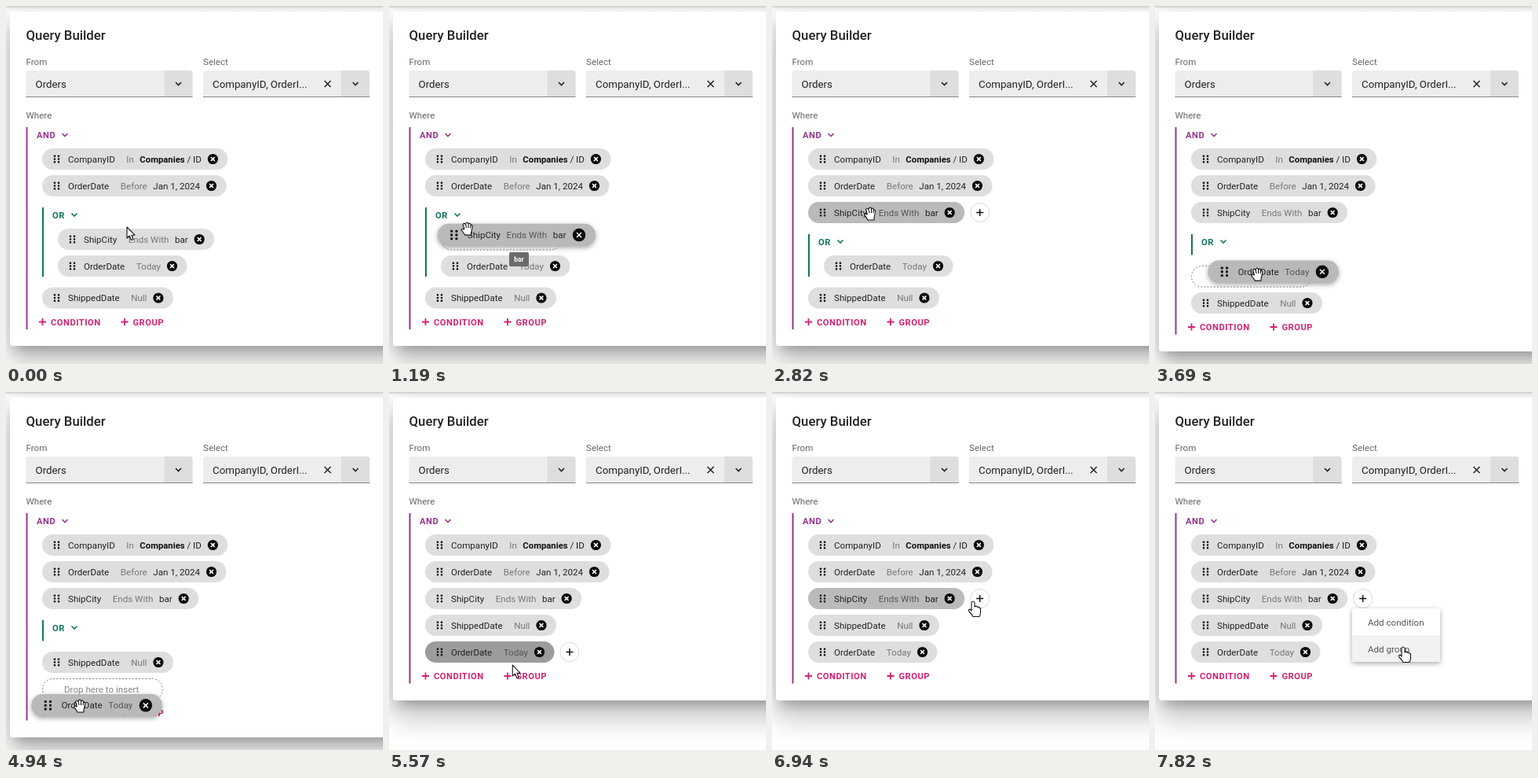
Animation of 480 by 455 pixels, one loop 8000 ms. Source, as an HTML page:

```html
<!DOCTYPE html>
<html lang="en">
<head>
<meta charset="utf-8">
<title>Query Builder</title>
<style>
html, body { margin: 0; width: 100%; height: 100%; overflow: hidden; background: #fff; }
#stage { position: relative; width: 100%; height: 100%; overflow: hidden; contain: strict; }
#panel { position: absolute; left: 5px; top: 7px; right: -40px; background: #fff; border-radius: 4px;
  box-shadow: 0 11px 15px -7px rgba(0,0,0,.26), 0 21px 34px 1px rgba(0,0,0,.16), 0 9px 46px 6px rgba(0,0,0,.11); }
#edge { position: absolute; top: 0; width: 100%; height: 4px; background: linear-gradient(#ccc, transparent); }
svg { position: absolute; left: 0; top: 0; font: 11.6px Roboto, Inter, sans-serif; fill: #222; }
.title { font-size: 16.8px; font-weight: 500; }
.label { fill: #666; }
.value { font-size: 13.3px; }
.caps { font-size: 11.2px; font-weight: 600; letter-spacing: .5px; }
.bold { font-weight: 700; font-size: 11.3px; fill: #111; }
.line { fill: none; stroke: #222; stroke-width: 1.4; }
.lift { filter: drop-shadow(0 2px 3px rgba(0,0,0,.35)); }
.cursor { fill: #fff; stroke: #111; stroke-width: 1.1; stroke-linejoin: round; }
</style>
</head>
<body>
<div id="stage">
  <div id="panel"></div>
  <div id="edge"></div>
  <svg width="480" height="455" viewBox="0 0 480 455">
    <text class="title" x="25.5" y="43">Query Builder</text>
    <g class="label">
      <text x="25.5" y="75">From</text>
      <text x="251" y="75">Select</text>
      <text x="25.5" y="143">Where</text>
    </g>
    <g id="fields"></g>
    <g id="scene"></g>
  </svg>
</div>
<script>
const LOOP = 8000, LAG = 45, DROPPED = 5150, CLICK = 6690, MENU = 7130;
const PURPLE = '#97358f', TEAL = '#12765f', PINK = '#d42273';
const $ = id => document.getElementById(id);

const chips = {
  C: { name: 'CompanyID', op: 'In', bold: 'Companies', val: ' / ID' },
  B: { name: 'OrderDate', op: 'Before', val: 'Jan 1, 2024' },
  S: { name: 'ShipCity', op: 'Ends With', val: 'bar', grab: 34 },
  T: { name: 'OrderDate', op: 'Today', grab: 63 },
  N: { name: 'ShippedDate', op: 'Null' }
};

// Row order over time: D is the drop slot, brackets enclose the OR group
const orders = [
  [0, 'CB[ST]N'], [700, 'CB[DT]N'], [1290, 'CBD[T]N'], [1380, 'CDB[T]N'], [2070, 'CBD[T]N'],
  [2720, 'CBS[T]N'], [3500, 'CB S[D]N'.replace(' ', '')], [3620, 'CBS[]DN'], [4250, 'CBS[]ND'], [DROPPED, 'CBSNT']
];

// Pointer stops: time, x, y
const stops = [
  [70, 154, 281], [380, 100, 297], [570, 100, 297], [1070, 93, 297], [1500, 127, 225], [1780, 127, 220],
  [2200, 125, 264], [3190, 125, 264], [3480, 131, 331], [3940, 129, 354], [4440, 124, 385], [4600, 124, 385],
  [4940, 94, 399], [5200, 94, 399], [6070, 256, 266], [MENU, 256, 266], [7820, 316, 324]
];

const cursors = {
  arrow: 'M0 0V14L3.2 11L5.6 16.5L8 15.4L5.8 10.2H10Z',
  grab: 'M-4-1L-5.5-5.5Q-4-8-2-5.5Q-1-9 1-7.5L2-6.3Q4-8 4.7-5Q7-5 6.6-2L5 5V8H-3Q-5 4-7.5 1.5Q-7-1-4 1Z' +
    'M-2-5.5L-1-1M1.5-6.5V-1M4.6-5L4-.8',
  point: 'M-2 1.5Q0-1.5 2 1.5V7Q4 5 5.5 7.5Q7.5 6 8 8.5Q10 8 9.5 11V14Q9.5 17 8 19.5H0Q-2 16-5 13Q-6.5 10.5-4 10L-2 12Z'
};

function pointer(t) {
  const i = stops.findIndex(s => s[0] > t);
  if (i < 1) return stops.at(i).slice(1);
  const [a, b] = [stops[i - 1], stops[i]];
  const u = (t - a[0]) / (b[0] - a[0]), k = u * u * (3 - 2 * u);
  return [a[1] + (b[1] - a[1]) * k, a[2] + (b[2] - a[2]) * k];
}

// Lay each chip out from the widths of its texts
const pen = document.createElement('canvas').getContext('2d');
function measure(s = '', font = '11.6px') {
  pen.font = font + ' Roboto, Inter, sans-serif';
  return pen.measureText(s).width;
}
for (const c of Object.values(chips)) {
  c.opX = 47.5 + measure(c.name);
  c.valX = c.opX + measure(c.op) + 7.5;
  const end = c.val ? c.valX + measure(c.bold, '700 11.3px') + measure(c.val) : c.valX - 7.5;
  c.closeX = end + 14.5;
  c.w = c.closeX + 19;
}

const text = (x, y, s, attrs = '') => `<text x="${x}" y="${y}" ${attrs}>${s}</text>`;
const rect = (x, y, w, h, r, fill, attrs = '') =>
  `<rect x="${x}" y="${y}" width="${w}" height="${h}" rx="${r}" fill="${fill}" ${attrs}/>`;
const stroke = (d, color = '#222', width = 1.4) =>
  `<path class="line" d="${d}" style="stroke:${color};stroke-width:${width}"/>`;
const chevron = (x, y, color) => stroke(`M${x - 3.5} ${y - 2}l3.5 3.5l3.5-3.5`, color, 1.6);
const cross = (x, y, r, color) =>
  stroke(`M${x - r} ${y - r}l${2 * r} ${2 * r}M${x + r} ${y - r}l${-2 * r} ${2 * r}`, color, 1.5);
const plus = (x, y, r, color, width) => stroke(`M${x - r} ${y}h${2 * r}M${x} ${y - r}v${2 * r}`, color, width);

function field(x, label) {
  return `<path d="M${x} 116V86q0-4 4-4h204q4 0 4 4v30z" fill="#ededed"/>` +
    `<path d="M${x + 176} 116V82h32q4 0 4 4v30z" fill="#dedede"/>` +
    rect(x, 115, 212, 1, 0, '#888') + text(x + 12, 104, label, 'class="value"') + chevron(x + 194, 99);
}

function handle(x, y, k) {
  let out = '';
  for (let i = 0; i < 6; i++)
    out += rect(x + (i % 2 * 5 - 3.7) * k, y + ((i >> 1) * 3.8 - 5) * k, 2.4 * k, 2.4 * k, .7, '#111');
  return out;
}

// Chip contents around the middle line y; a lifted chip is slightly larger
function chip(key, x, y, fill, lifted) {
  const c = chips[key], k = lifted ? 1.25 : 1, h = lifted ? 28.5 : 27, w = c.w + (lifted ? 2 : 0);
  const shift = x - (lifted ? 2 : 0), end = x + c.closeX;
  const bold = c.bold ? `<tspan class="bold">${c.bold}</tspan>` : '';
  return rect(x, y - h / 2, w, h, h / 2, fill, lifted ? 'class="lift"' : '') +
    handle(x + 18.5 + (k - 1) * 10, y, k) +
    text(x + 33 + (k - 1) * 20, y + 4, c.name) +
    text(shift + c.opX, y + 4, c.op, `fill="${fill === '#dedede' ? '#777' : '#555'}"`) +
    (c.val ? text(shift + c.valX, y + 4, bold + c.val) : '') +
    `<circle cx="${end}" cy="${y}" r="${6.6 * k}" fill="#0a0a0a"/>` + cross(end, y, 2.4 * k, '#fff');
}

const addButton = (x, y) =>
  `<circle cx="${x}" cy="${y}" r="12" fill="#fff" stroke="#d8d8d8"/>` + plus(x, y, 4.5, '#111', 1.5);

const slot = (x, y) =>
  rect(x + .5, y - 13, 153, 26.5, 13.2, '#fff', 'stroke="#888" stroke-dasharray="2.2 2"') +
  text(x + 28, y + 4, 'Drop here to insert', 'fill="#888"');

const header = (x, y, s, color) =>
  text(x, y + 4, s, `class="caps" fill="${color}"`) + chevron(x + (s === 'OR' ? 28 : 36), y, color);

const button = (x, y, s) =>
  plus(x + 4.5, y, 4.5, PINK, 1.8) + text(x + 15, y + 4, s, `class="caps" fill="${PINK}"`);

// Draws the condition tree and tells which cursor the pointer needs
function tree(t, order, dragging, mx, my) {
  let out = header(39, 164, 'AND', PURPLE), cursor = dragging ? 'grab' : t < MENU ? 'arrow' : 'point';
  let x = 46, y = 194.5, top = 0, filled = false;
  for (const key of order) {
    if (key === '[') {
      top = y - 6.5;
      out += header(59, y + 3, 'OR', TEAL);
      x = 66; y += 34; filled = false;
    } else if (key === ']') {
      if (!filled) y += 6.5;
      out += rect(46, top, 2, y - 20.5 - top, 0, TEAL);
      x = 46; y += 6.5;
    } else {
      if (key === 'D') out += slot(x, y);
      else {
        const right = x + chips[key].w;
        const hover = cursor === 'arrow' && Math.abs(my - y) < 14 && mx > x && mx < right + 32;
        const focus = key === 'T' && t >= DROPPED && t < CLICK;
        if (hover) cursor = mx > right ? 'point' : 'grab';
        out += chip(key, x, y, focus ? '#9c9c9c' : hover ? '#bababa' : '#dedede');
        if (hover || focus || key === 'S' && t >= MENU) out += addButton(right + 19.5, y);
      }
      y += 34; filled = true;
    }
  }
  out += button(42, y - 3.5, 'CONDITION') + button(146.5, y - 3.5, 'GROUP') + rect(25.5, 154, 2, y - 148, 0, PURPLE);
  $('panel').style.height = y + 20 + 'px';
  return [out, cursor];
}

function menu(t, my) {
  if (t < MENU) return '';
  const item = my > 309 ? 309 : 275;
  return `<g opacity="${Math.min(1, (t - MENU + 60) / 180)}">` + rect(251, 275, 112, 68, 3, '#fff', 'class="lift"') +
    (my > 275 ? rect(251, item, 112, 34, 3, '#f3f2f2') : '') +
    text(271, 296.5, 'Add condition', 'fill="#555"') + text(271, 330.5, 'Add group', 'fill="#555"') + '</g>';
}

function draw() {
  const t = performance.now() % LOOP, [mx, my] = pointer(t);
  const order = orders.filter(o => o[0] <= t).pop()[1];
  const dragged = order.includes('D') && (order.includes('S') ? 'T' : 'S');
  let [out, cursor] = tree(t, order, dragged, mx, my);
  if (dragged) {
    const [x, y] = pointer(t - LAG);
    out += chip(dragged, x - chips[dragged].grab, y, '#b9b9b9', true);
  }
  if (t > 620 && t < 1330)
    out += rect(153, 313, 25, 18, 2, '#6b6b6b') +
      text(165.5, 325, 'bar', 'fill="#fff" font-size="8.5" font-weight="700" text-anchor="middle"');
  out += menu(t, my) + `<path class="cursor" transform="translate(${mx} ${my})" d="${cursors[cursor]}"/>`;
  $('scene').innerHTML = out;
  requestAnimationFrame(draw);
}

$('fields').innerHTML = field(25.5, 'Orders') + field(251, 'CompanyID, OrderI...') + cross(409.5, 99, 4, '#222');
draw();
</script>
</body>
</html>
```
